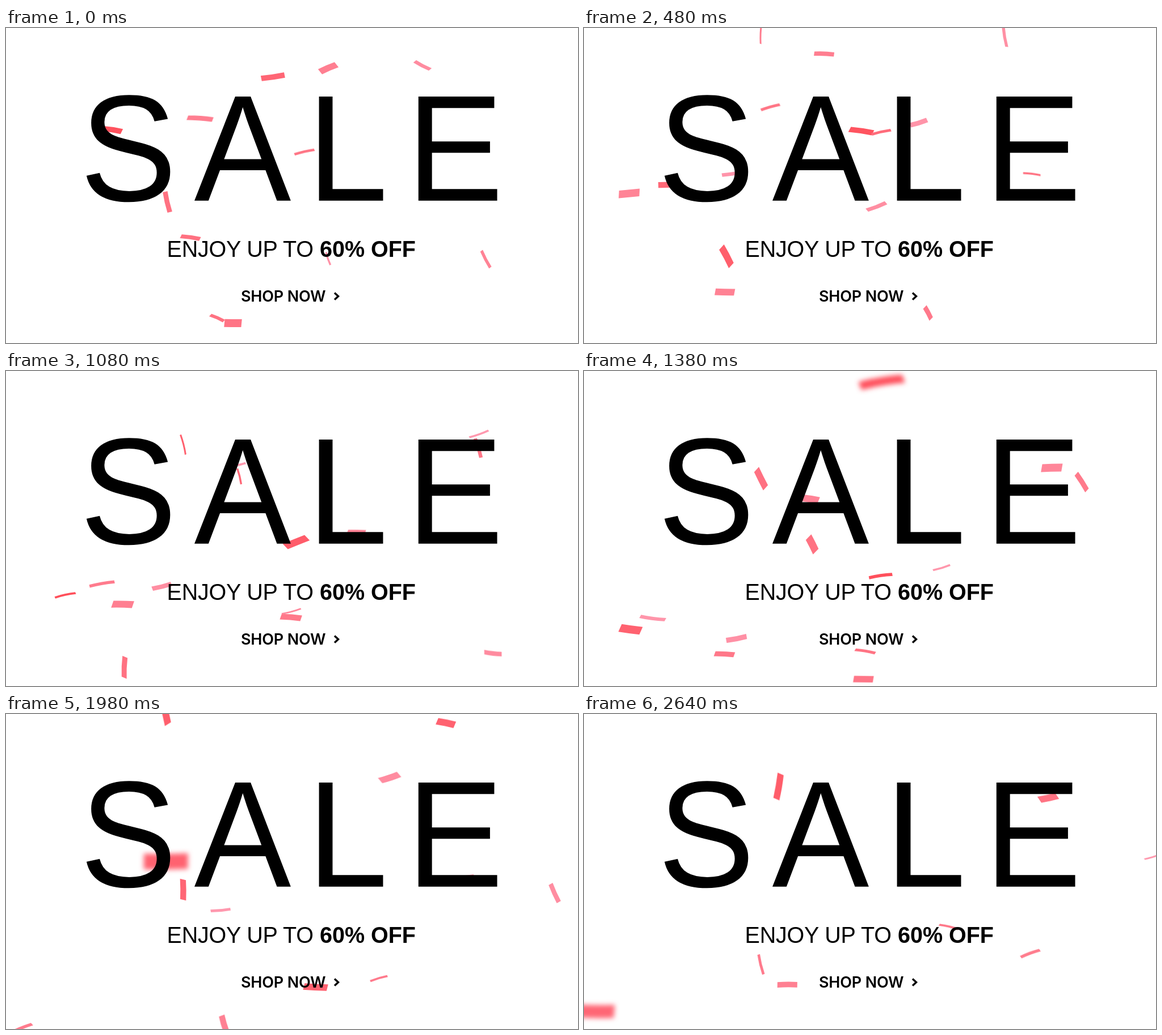
These frames come from a looping animation (1008 by 556 pixels, 2.7 s). An HTML page:

```html
<!DOCTYPE html>
<html lang="en">
<head>
<meta charset="utf-8">
<title>Sale</title>
<style>
  html, body { margin: 0; width: 100%; height: 100%; overflow: hidden; background: #fff; }
  svg { display: block; width: 100vw; height: 100vh; }
  .wide { font-family: "Liberation Sans", Arial, sans-serif; }
  .cta { font: 600 27px Inter, sans-serif; letter-spacing: -.2px; }
</style>
</head>
<body>
<svg viewBox="0 0 1008 556">
  <defs>
    <filter id="soft" x="0" y="0" width="1008" height="556" filterUnits="userSpaceOnUse">
      <feGaussianBlur stdDeviation=".6"/>
    </filter>
    <filter id="blur" x="-100" y="-100" width="1208" height="756" filterUnits="userSpaceOnUse">
      <feGaussianBlur stdDeviation="4"/>
    </filter>
  </defs>
  <g id="far" filter="url(#soft)"></g>
  <g id="near" filter="url(#blur)"></g>
  <g class="wide">
    <text transform="translate(0 304.7) scale(1 1.043)" font-size="256" x="130.3 331.6 530.6 705.8">SALE</text>
    <g transform="translate(0 404) scale(1 1.04)" font-size="39.5">
      <text x="283.5" letter-spacing="-.2">ENJOY UP TO</text>
      <text x="553" font-weight="700">60% OFF</text>
    </g>
  </g>
  <text class="cta" x="414" y="483">SHOP NOW</text>
  <path d="M579 467.5l6.5 6-6.5 6" fill="none" stroke="#000" stroke-width="3.4"/>
</svg>
<script>
const LOOP = 2700, STEP = 60, TOP = -20, BOTTOM = 580;
const pieces = [];

let seed = 11;
function random(min, max) {
  seed = (seed * 16807) % 2147483647;
  return min + (max - min) * seed / 2147483647;
}

// Each piece: when it passes the top edge (ms), where, and its drift (px/s).
function shower(layer, speed, size, starts) {
  for (const [born, x, drift] of starts) {
    const el = document.createElementNS('http://www.w3.org/2000/svg', 'path');
    document.getElementById(layer).append(el);
    pieces.push({
      el, born, x, drift, speed,
      w: size * random(.7, 1.35),
      h: size * random(.3, .44),
      tilt: random(-12, 12) + (random(0, 1) < .15 ? 80 : 0),
      tone: random(.2, 1.3),
      phase: random(0, 2 * Math.PI),
      spin: random(4, 7)
    });
  }
}

shower('far', 200, 34, [
  [-2035, 405, 80], [-1850, 621, -160], [-1535, 392, -70], [-1095, 550, -22],
  [-980, -227, 210], [-900, 253, -75], [-800, 470, -160], [-430, 454, 38],
  [-355, 552, 45], [250, 430, -30], [400, 730, 150], [430, 312, 0],
  [525, 850, -30], [1900, 770, 65], [2000, 282, 95]
]);
shower('far', 400, 34, [
  [-1302, 400, 0], [-1280, 372, 0], [-1020, 760, 84], [-165, 715, 115],
  [20, 540, -35], [130, 360, -90], [615, 425, -30], [1700, 690, -50], [2010, 1030, -45]
]);
shower('near', 400, 80, [[1330, 545, -405]]);

function draw(p, t) {
  const age = (t - p.born) / 1000;
  const y = p.speed * age;
  if (y < TOP || y > BOTTOM) {
    p.el.setAttribute('display', 'none');
    return;
  }
  // Tumbling squashes the height, rocks the strip and shifts its shade.
  const turn = p.phase + p.spin * age;
  const flip = Math.max(.25, Math.abs(Math.cos(turn)));
  const rock = Math.sin(turn * .7);
  const tone = p.tone + .35 * Math.sin(turn);
  const a = p.w / 2, b = p.h * flip / 2, curl = Math.sin(turn) * p.w / 20;
  const x = p.x + p.drift * age;

  p.el.removeAttribute('display');
  p.el.setAttribute('d', `M${-a} ${-b}Q0 ${curl - b} ${a} ${-b}V${b}Q0 ${curl + b} ${-a} ${b}Z`);
  p.el.setAttribute('transform', `translate(${x} ${y}) rotate(${p.tilt + 16 * rock}) skewX(${-22 * rock})`);
  p.el.setAttribute('fill', `rgb(255 ${Math.round(84 + tone * 42)} ${Math.round(96 + tone * 48)})`);
}

function tick() {
  const t = Math.floor((performance.now() - start) % LOOP / STEP) * STEP;
  for (const p of pieces) draw(p, t);
  requestAnimationFrame(tick);
}

const start = performance.now();
tick();
</script>
</body>
</html>
```
